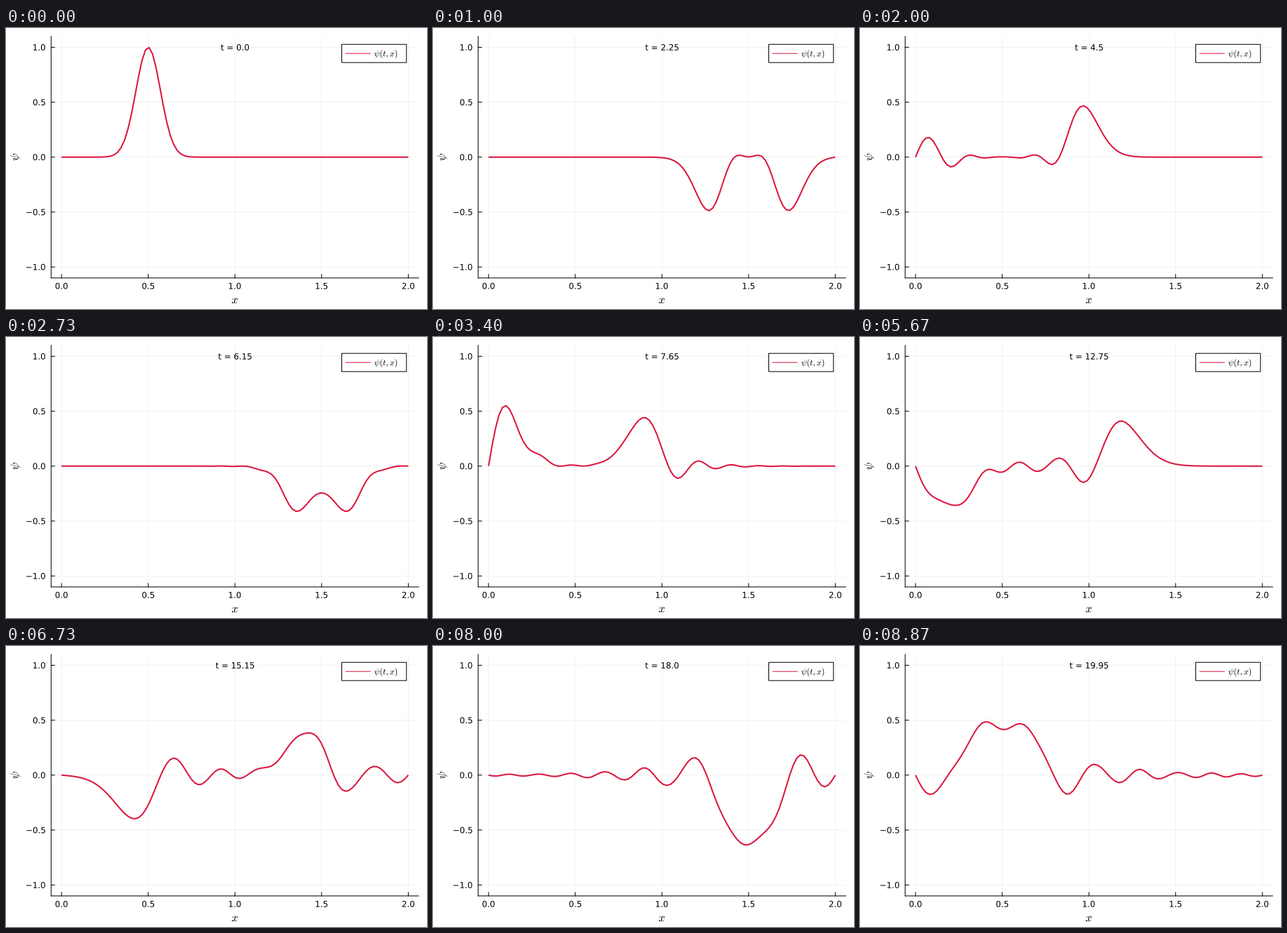
These frames come from a looping animation (600 px wide and 400 px high, 8940 ms). A matplotlib script:

```python
import numpy as np
import matplotlib.pyplot as plt
from matplotlib.animation import FuncAnimation
from matplotlib.patches import PathPatch, Rectangle
from matplotlib.textpath import TextPath
from matplotlib.transforms import Affine2D

plt.rcParams.update({"font.family": "DejaVu Sans", "mathtext.fontset": "cm"})

PX = 0.72                      # one pixel in points at 100 dpi
LOOP, TICK = 8940, 20          # ms
RATE, STEPS, DT = 15, 134, 0.15
CRIMSON = "#dc143c"
LEFT, RIGHT, TOP, BOTTOM = 64.3, 588.19, 11.81, 355.8


def to_x(x):
    return LEFT + (np.asarray(x) + 0.06) / 2.12 * (RIGHT - LEFT)


def to_y(y):
    return TOP + (1.1 - np.asarray(y)) / 2.2 * (BOTTOM - TOP)


# Wave equation on a 100-point grid with fixed ends, solved by sine modes.
N = 99
x = np.linspace(0, 2, N + 1)
start = np.exp(-100 * (x - 0.5) ** 2)
mode = np.arange(1, N)
basis = np.sin(np.pi * np.outer(np.arange(N + 1), mode) / N)
coef = 2 / N * basis.T @ start
omega = N * np.sin(np.pi * mode / (2 * N))


def psi(t):
    return basis @ (coef * np.cos(omega * t))


fig = plt.figure(figsize=(6, 4), dpi=100, facecolor="white")
ax = fig.add_axes([0, 0, 1, 1])
ax.set_xlim(0, 600)
ax.set_ylim(400, 0)
ax.axis("off")


def line(xs, ys, width=1.0, color="black", z=3, **kw):
    return ax.plot(xs, ys, color=color, lw=width * PX, zorder=z,
                   snap=False, **kw)[0]


def outline(text, px, py, size=11.85, align=0.5, middle=False, turn=0):
    """Text outline at a subpixel place; py is the baseline or the middle."""
    path = TextPath((0, 0), text, size=size)
    path = path.transformed(Affine2D().scale(1, -1).rotate_deg(-turn))
    box = path.get_extents()
    dx = px - box.x0 - align * box.width
    dy = py - (box.y0 + box.y1) / 2 if middle else py
    return path.transformed(Affine2D().translate(dx, dy))


def label(*args, **kw):
    return ax.add_patch(PathPatch(outline(*args, **kw), facecolor="black",
                                  lw=0, snap=False, zorder=6))


def grid(xs, ys):
    line(xs, ys, 0.5, z=1, alpha=0.1)


for v in np.arange(0, 2.1, 0.5):
    p = to_x(v)
    grid([p, p], [TOP, BOTTOM])
    line([p, p], [BOTTOM, BOTTOM - 5])
    label(f"{v:.1f}", p, 371.5)

for v in np.arange(-1, 1.1, 0.5):
    p = to_y(v)
    grid([LEFT, RIGHT], [p, p])
    line([LEFT, LEFT + 5], [p, p])
    label(f"{v:.1f}".replace("-", "\u2212"), 55.8, p + 4.4, align=1)

line([LEFT, LEFT], [TOP, BOTTOM])
line([LEFT, RIGHT], [BOTTOM, BOTTOM])
label("$x$", 326, 388.3, 16.5, middle=True)
label(r"$\psi$", 13.3, 184, 16.5, middle=True, turn=90)

ax.add_patch(Rectangle((478.5, 23.28), 92.23, 25.92, facecolor="white",
                       edgecolor="black", lw=PX, zorder=5, snap=False))
line([484.3, 519.25], [36.24, 36.24], 1, CRIMSON, 6)
label(r"$\psi(t,x)$", 525, 37.3, 12, align=0, middle=True)

curve = line(to_x(x), to_y(start), 2.0, CRIMSON, 4,
             solid_joinstyle="round", solid_capstyle="butt")


def clock_path(t):
    return outline(f"t = {t}", to_x(1), to_y(1) + 4.4)


clock = ax.add_patch(PathPatch(clock_path(0.0), facecolor="black", lw=0,
                               snap=False, zorder=6))


def draw(k):
    # 15 steps a second, each start rounded to 10 ms
    step = min(int((k * TICK + 15) * RATE / 1000), STEPS - 1)
    t = round(step * DT, 2)
    curve.set_ydata(to_y(psi(t)))
    clock.set_path(clock_path(t))
    return curve, clock


anim = FuncAnimation(fig, draw, frames=LOOP // TICK, interval=TICK,
                     init_func=lambda: draw(0), repeat=True, repeat_delay=0)
plt.show()
```
